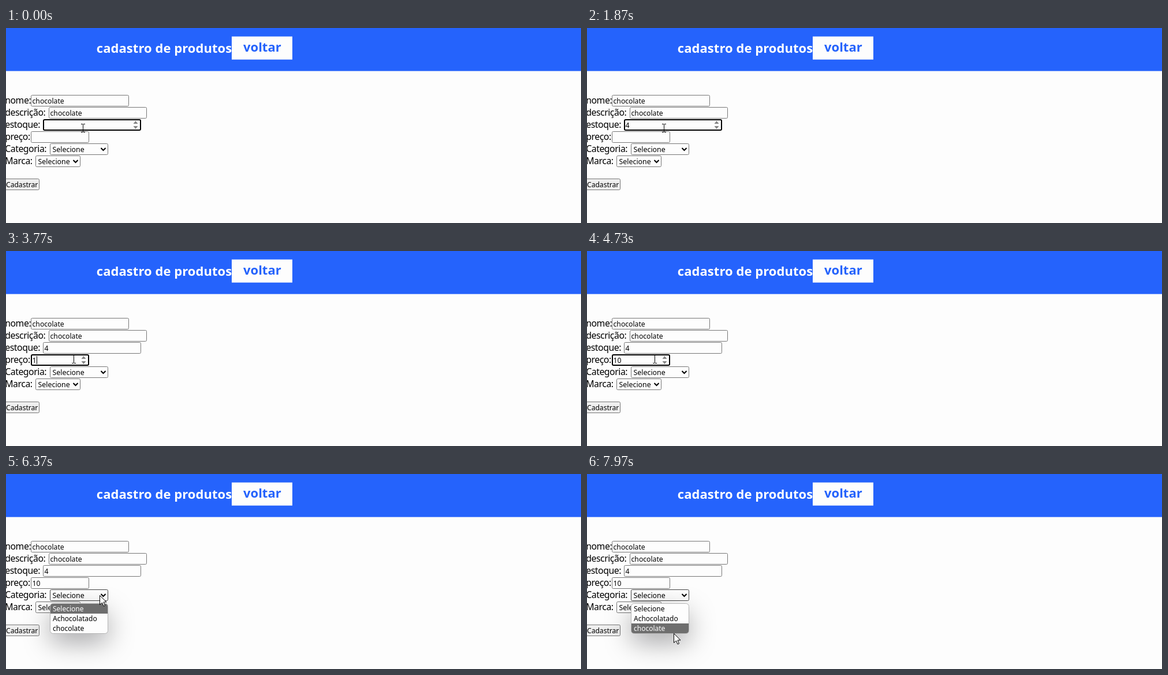
Write an HTML page with a canvas that moves like this. It is 996 px wide and 338 px high and loops after 8 s.

```html
<!DOCTYPE html>
<html lang="pt-BR">
<head>
<meta charset="utf-8">
<title>cadastro de produtos</title>
<style>
html, body { margin: 0; width: 100%; height: 100%; overflow: hidden; background: #fdfdfd; }
canvas { display: block; }
</style>
</head>
<body>
<canvas id="stage" width="996" height="338"></canvas>
<script>
const ctx = document.getElementById('stage').getContext('2d');
const LOOP = 8000;
const INK = '#000';
const PAPER = '#fdfdfd';
const BLUE = '#2563fc';
const EDGE = '#767676';
const FAMILY = '"Noto Sans", "Open Sans", sans-serif';

// Moments of the interaction, in ms
const STOCK_FOCUS = -600, STOCK_TYPED = 1000;
const PRICE_FOCUS = 2250, DIGIT_ONE = 3550, DIGIT_ZERO = 3800;
const MENU_OPEN = 6250;

// time, x, y of the pointer hot spot
const PATH = [
  [0, 133, 173], [1900, 133, 173], [2200, 117, 187], [5150, 117, 187],
  [5700, 162, 210], [6350, 162, 210], [6650, 165, 217],
  [7350, 165, 217], [7850, 150, 276], [LOOP, 150, 276]
];
const OPTIONS = ['Selecione', 'Achocolatado', 'chocolate'];

function text(str, x, y, size, color = INK, weight = 400, spacing = 0) {
  ctx.font = `${weight} ${size}px ${FAMILY}`;
  ctx.letterSpacing = `${spacing}px`;
  ctx.fillStyle = color;
  ctx.fillText(str, x, y);
}

function box(x, y, w, h, radius, fill, stroke, line = 1) {
  const inset = line / 2;
  ctx.beginPath();
  ctx.roundRect(x + inset, y + inset, w - line, h - line, radius);
  ctx.fillStyle = fill;
  ctx.fill();
  ctx.strokeStyle = stroke;
  ctx.lineWidth = line;
  ctx.stroke();
}

function shape(points, fill, stroke) {
  ctx.beginPath();
  points.forEach(([x, y]) => ctx.lineTo(x, y));
  ctx.closePath();
  ctx.fillStyle = fill;
  ctx.fill();
  if (stroke) {
    ctx.strokeStyle = stroke;
    ctx.lineWidth = 1;
    ctx.stroke();
  }
}

function spinner(x, y) {
  shape([[x - 4, y + 8], [x, y + 3], [x + 4, y + 8]], '#858585');
  shape([[x - 4, y + 12], [x, y + 17], [x + 4, y + 12]], '#858585');
}

function field(x, y, w, value, focused, caret) {
  box(x, y, w, 20, 2, PAPER, focused ? '#000' : EDGE, focused ? 2 : 1);
  text(value, x + 2.5, y + 14.5, 12.2);
  if (!focused) return;
  const caretX = Math.round(x + 3 + ctx.measureText(value).width);
  spinner(x + w - 9.5, y);
  if (caret) {
    ctx.fillStyle = '#000';
    ctx.fillRect(caretX, y + 3, 1, 14);
  }
}

function select(x, y, w, hovered) {
  box(x, y, w, 20, 2, PAPER, hovered ? '#454545' : EDGE);
  text('Selecione', x + 4.5, y + 14.5, 12.4);
  const cx = x + w - 8.5;
  ctx.beginPath();
  ctx.moveTo(cx - 4, y + 8);
  ctx.lineTo(cx, y + 12);
  ctx.lineTo(cx + 4, y + 8);
  ctx.strokeStyle = '#000';
  ctx.lineWidth = 2;
  ctx.stroke();
}

function menuOutline() {
  ctx.beginPath();
  ctx.roundRect(76.5, 224.5, 100, 52, 5);
}

function menu(active) {
  ctx.save();
  ctx.shadowColor = 'rgba(0, 0, 10, .34)';
  ctx.shadowBlur = 46;
  ctx.shadowOffsetY = 16;
  menuOutline();
  ctx.fillStyle = PAPER;
  ctx.fill();
  ctx.restore();

  ctx.save();
  menuOutline();
  ctx.clip();
  OPTIONS.forEach((name, i) => {
    const top = 225 + 17 * i;
    if (i === active) {
      ctx.fillStyle = '#6e6e6e';
      ctx.fillRect(77, top, 99, 17);
    }
    text(name, 81, top + 13, 12, i === active ? '#fff' : INK);
  });
  ctx.restore();
  menuOutline();
  ctx.strokeStyle = '#b4b4b4';
  ctx.lineWidth = 1;
  ctx.stroke();
}

function pointerAt(t) {
  const i = PATH.findIndex((p, k) => k > 0 && t <= p[0]);
  const [t0, x0, y0] = PATH[i - 1], [t1, x1, y1] = PATH[i];
  const u = (t - t0) / (t1 - t0);
  const e = u * u * (3 - 2 * u);
  return [Math.round(x0 + (x1 - x0) * e), Math.round(y0 + (y1 - y0) * e)];
}

function beam(x, y) {
  ctx.fillStyle = '#000';
  ctx.fillRect(x, y - 6, 1, 13);
  for (const end of [y - 7, y + 7]) {
    ctx.fillRect(x - 3, end, 3, 1);
    ctx.fillRect(x + 1, end, 3, 1);
  }
}

function arrow(x, y) {
  const outline = [[0, 0], [0, 16], [4, 12.5], [6.5, 18.5], [9, 17.5], [6.5, 11.5], [11.5, 11.5]];
  shape(outline.map(([dx, dy]) => [x + dx + .5, y + dy + .5]), '#fff', '#000');
}

function draw(t) {
  const blinkOn = since => (t - since) % 1000 < 500;
  const [px, py] = pointerAt(t);
  const onPrice = t >= PRICE_FOCUS;
  const open = t >= MENU_OPEN;
  const stock = t >= STOCK_TYPED ? '4' : '';
  const price = t >= DIGIT_ZERO ? '10' : t >= DIGIT_ONE ? '1' : '';
  const priceKey = price === '10' ? DIGIT_ZERO : price ? DIGIT_ONE : PRICE_FOCUS;

  ctx.fillStyle = PAPER;
  ctx.fillRect(0, 0, 996, 338);
  ctx.fillStyle = BLUE;
  ctx.fillRect(0, 0, 996, 74.6);
  text('cadastro de produtos', 156.8, 43, 22, '#fff', 700, .05);
  ctx.fillStyle = PAPER;
  ctx.fillRect(391, 14.7, 105, 40);
  text('voltar', 411, 41, 22, BLUE, 700);

  ['nome:', 'descrição:', 'estoque:', 'preço:', 'Categoria:', 'Marca:']
    .forEach((label, i) => text(label, -1.8, 131 + 21 * i, 15.8, INK, 400, -.45));

  field(43, 116, 170, 'chocolate');
  field(74, 137, 170, 'chocolate');
  field(64, 158, 170, stock, !onPrice, blinkOn(stock ? STOCK_TYPED : STOCK_FOCUS));
  field(43, 179, 101, price, onPrice && !open, blinkOn(priceKey));
  select(76, 200, 101, px >= 76 && py >= 200);
  select(51, 221, 78);

  box(-3, 261, 61, 20, 2, '#efefef', EDGE);
  text('Cadastrar', 0, 275.5, 12.1);

  if (open) menu(py < 242 ? 0 : py < 259 ? 1 : 2);
  if (py < 199) beam(px, py);
  else arrow(px, py);
}

function tick(now) {
  draw(now % LOOP);
  requestAnimationFrame(tick);
}
draw(0);
requestAnimationFrame(tick);
</script>
</body>
</html>
```
